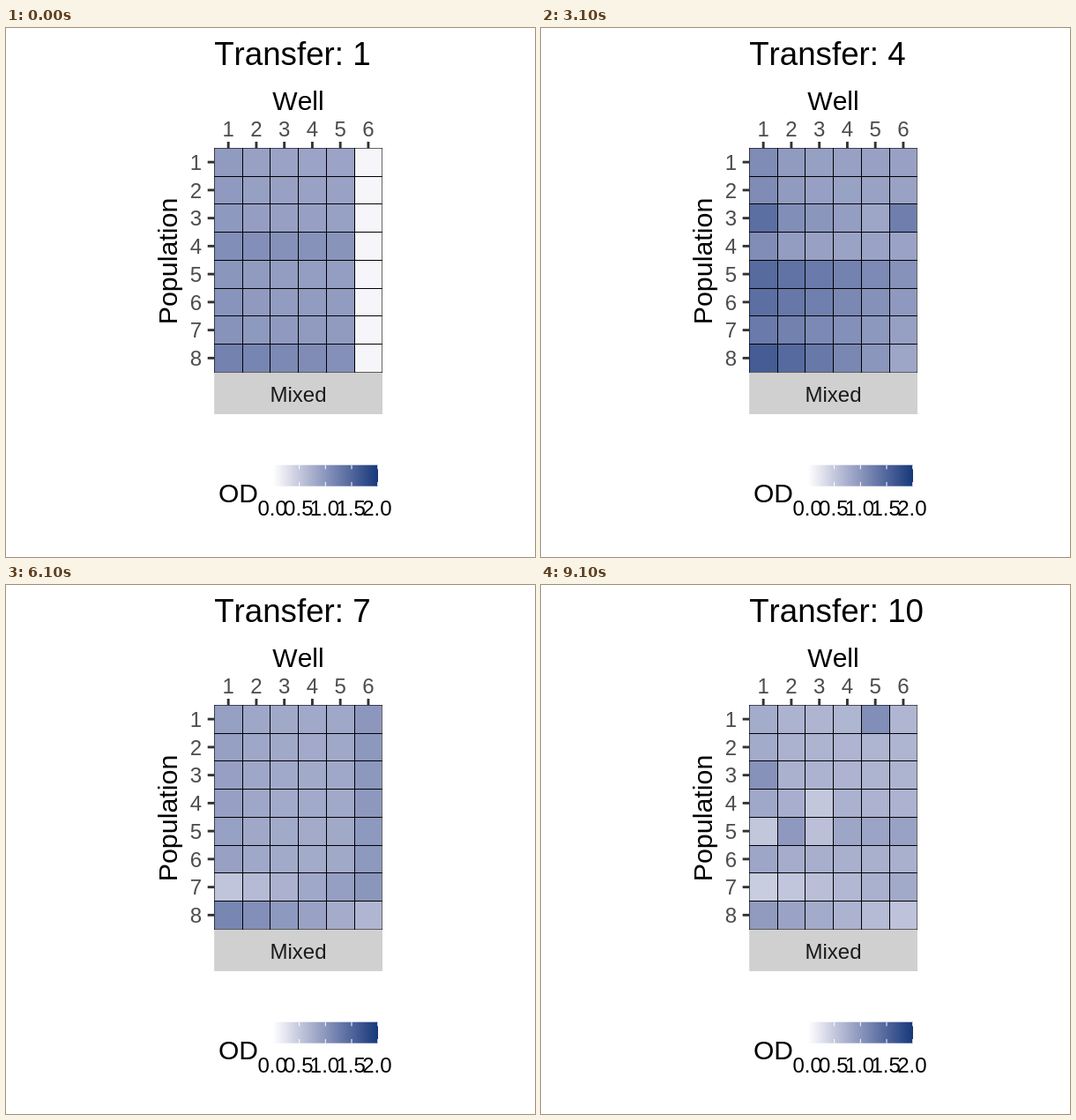
An HTML page for the animation above (10 s loop, 600 by 600 pixels).

```html
<!DOCTYPE html>
<html lang="en">
<head>
<meta charset="utf-8">
<title>OD by transfer</title>
<style>
  html, body { margin: 0; width: 100%; height: 100%; overflow: hidden; background: #fff; }
  svg { display: block; width: 600px; height: 600px; }
  text {
    font-family: "Liberation Sans", Arial, Helvetica, sans-serif;
    font-size: 30px;
    font-kerning: none;
  }
  .small { font-size: 24px; }
  .axis { fill: #4d4d4d; }
  .mid { text-anchor: middle; }
  .end { text-anchor: end; }
</style>
</head>
<body>
<svg viewBox="0 0 600 600">
  <defs><linearGradient id="scale"></linearGradient></defs>
  <text id="title" x="236.2" y="42" style="font-size:36.7px"></text>
  <text class="mid" x="331.5" y="93">Well</text>
  <text class="mid" transform="translate(194 264.5) rotate(-90)" style="font-size:30.4px">Population</text>
  <rect x="236.2" y="390.5" width="190.8" height="47.5" fill="#d0d0d0"/>
  <g id="cells" shape-rendering="crispEdges"></g>
  <g id="grid" shape-rendering="crispEdges"></g>
  <g id="axes"></g>
  <text class="small mid" x="331.5" y="424" fill="#1a1a1a">Mixed</text>
  <text x="241" y="538">OD</text>
  <rect x="303" y="495.7" width="119" height="24" fill="url(#scale)"/>
  <g id="legend"></g>
</svg>
<script>
const ROWS = 8, COLS = 6, LEFT = 236.3, TOP = 136.25, SIZE = 31.75;
const LOOP = 10000, BLANK = 4;
const $ = id => document.getElementById(id);
const lerp = (a, b, t) => a + (b - a) * t;
const colX = c => Math.floor(LEFT + c * SIZE);
const rowY = r => Math.floor(TOP + r * SIZE);

function add(parent, tag, attrs, text) {
  const el = document.createElementNS('http://www.w3.org/2000/svg', tag);
  for (const k in attrs) el.setAttribute(k, attrs[k]);
  if (text !== undefined) el.textContent = text;
  return parent.appendChild(el);
}

// White to navy, with green bent slightly as in a Lab blend; v is 0..100.
function shade(v) {
  const t = v / 100;
  const r = 255 - 233 * t;
  const g = 255 - 199 * t - 24 * t * (1 - t);
  const b = 255 - 133 * t;
  return `rgb(${Math.round(r)},${Math.round(g)},${Math.round(b)})`;
}

// Density runs from top to bottom row, and rises near the first and last well.
// `runs` are rows with their own slope, `spots` single wells that stand out.
function plate({ top, bottom = top, first = 0, last = 0, runs = {}, spots = {} }) {
  return (row, well) => {
    const spot = spots[row + '-' + well];
    if (spot !== undefined) return spot;
    if (runs[row]) return lerp(...runs[row], (well - 1) / (COLS - 1));
    return lerp(top, bottom, (row - 1) / (ROWS - 1))
      + first * 0.3 ** (well - 1) + last * 0.1 ** (COLS - well);
  };
}
const blend = (a, b) => (r, w) => (a(r, w) + b(r, w)) / 2;
const withLast = (p, last) => (r, w) => (w === COLS ? last : p)(r, w);
const blank = () => BLANK;

const early = plate({ top: 43, bottom: 48, first: 4, runs: { 4: [54, 50], 8: [60, 51] } });
const third = plate({
  top: 45, first: 7, last: 1,
  runs: { 5: [60, 52], 6: [58, 51], 7: [53, 46], 8: [64, 44] },
  spots: { '4-6': 41, '5-6': 32 },
});
const fourth = plate({
  top: 44, bottom: 42, first: 11,
  runs: { 3: [58, 38], 5: [72, 52], 6: [70, 48], 7: [64, 45], 8: [80, 42] },
  spots: { '3-1': 70, '3-6': 62 },
});
const fifth = plate({
  top: 41, bottom: 42, first: 3, last: 1,
  runs: { 1: [48, 48], 3: [38, 36], 4: [47, 38], 5: [52, 50], 6: [49, 45], 8: [60, 33] },
});
const seventh = plate({
  top: 40, bottom: 39, first: 5, last: 9,
  runs: { 7: [27, 50], 8: [58, 34] },
});
const ninth = plate({
  top: 38, first: 8, last: 8,
  runs: { 3: [42, 49], 5: [51, 50], 7: [39, 38], 8: [51, 30] },
  spots: { '4-1': 55, '4-3': 33, '5-3': 36, '7-2': 23 },
});
const tenth = plate({
  top: 34, bottom: 38, first: 5,
  runs: { 5: [38, 44], 7: [23, 40], 8: [47, 28] },
  spots: { '1-5': 54, '3-1': 52, '4-3': 26, '5-1': 26, '5-2': 48, '5-3': 29 },
});

const plates = [
  withLast(early, blank), withLast(third, blank), third, fourth, fifth,
  withLast(blend(fifth, seventh), fifth), seventh, blend(seventh, ninth), ninth, tenth,
];

// One transfer a second; most changes pass through a 100 ms half-way blend.
const single = [1, 5, 6];
const steps = [];
plates.forEach((data, i) => {
  const label = i + 1;
  if (i && !single.includes(i)) {
    steps.push({ at: i * 1000, label, data: blend(plates[i - 1], data) });
  }
  steps.push({ at: i * 1000 + (i > 1 ? 100 : 0), label, data });
});

const cells = [];
for (let r = 0; r < ROWS; r++) {
  for (let c = 0; c < COLS; c++) {
    const el = add($('cells'), 'rect', {
      x: colX(c), y: rowY(r),
      width: colX(c + 1) - colX(c), height: rowY(r + 1) - rowY(r),
    });
    cells.push({ el, row: r + 1, well: c + 1 });
  }
}

// Hairlines on whole pixels; the outer ones are half cut off by the panel.
const edge = (i, n) => (i % n ? 1 : 0.6);
for (let c = 0; c <= COLS; c++) {
  add($('grid'), 'rect',
    { x: colX(c), y: rowY(0), width: 1, height: rowY(ROWS) - rowY(0) + 1, opacity: edge(c, COLS) });
}
for (let r = 0; r <= ROWS; r++) {
  add($('grid'), 'rect',
    { x: colX(0), y: rowY(r), width: colX(COLS) - colX(0) + 1, height: 1, opacity: edge(r, ROWS) });
}

const tick = { stroke: '#333', 'stroke-width': 2.9 };
for (let c = 0; c < COLS; c++) {
  const x = LEFT + (c + 0.5) * SIZE;
  add($('axes'), 'line', { x1: x, x2: x, y1: 129, y2: 136.3, ...tick });
  add($('axes'), 'text', { x, y: 123, class: 'small axis mid' }, c + 1);
}
for (let r = 0; r < ROWS; r++) {
  const y = TOP + (r + 0.5) * SIZE;
  add($('axes'), 'line', { x1: 228.7, x2: LEFT, y1: y, y2: y, ...tick });
  add($('axes'), 'text', { x: 222, y: y + 8.8, class: 'small axis end' }, r + 1);
}

for (let i = 0; i <= 10; i++) {
  add($('scale'), 'stop', { offset: i / 10, 'stop-color': shade(i * 10) });
}
for (let i = 0; i <= 4; i++) {
  const x = 302.9 + i * 29.7;
  for (const y of [495.7, 515]) {
    add($('legend'), 'line', { x1: x, x2: x, y1: y, y2: y + 4.7, stroke: '#fff' });
  }
  add($('legend'), 'text', { x: x - 0.8, y: 553, class: 'small mid' }, (i / 2).toFixed(1));
}

let shown = null;
function draw(ms) {
  const t = ms % LOOP;
  const step = steps.filter(s => s.at <= t).pop();
  if (step === shown) return;
  shown = step;
  $('title').textContent = 'Transfer: ' + step.label;
  for (const { el, row, well } of cells) el.setAttribute('fill', shade(step.data(row, well)));
}

const t0 = performance.now();
function loop() {
  draw(performance.now() - t0);
  requestAnimationFrame(loop);
}
loop();
</script>
</body>
</html>
```
